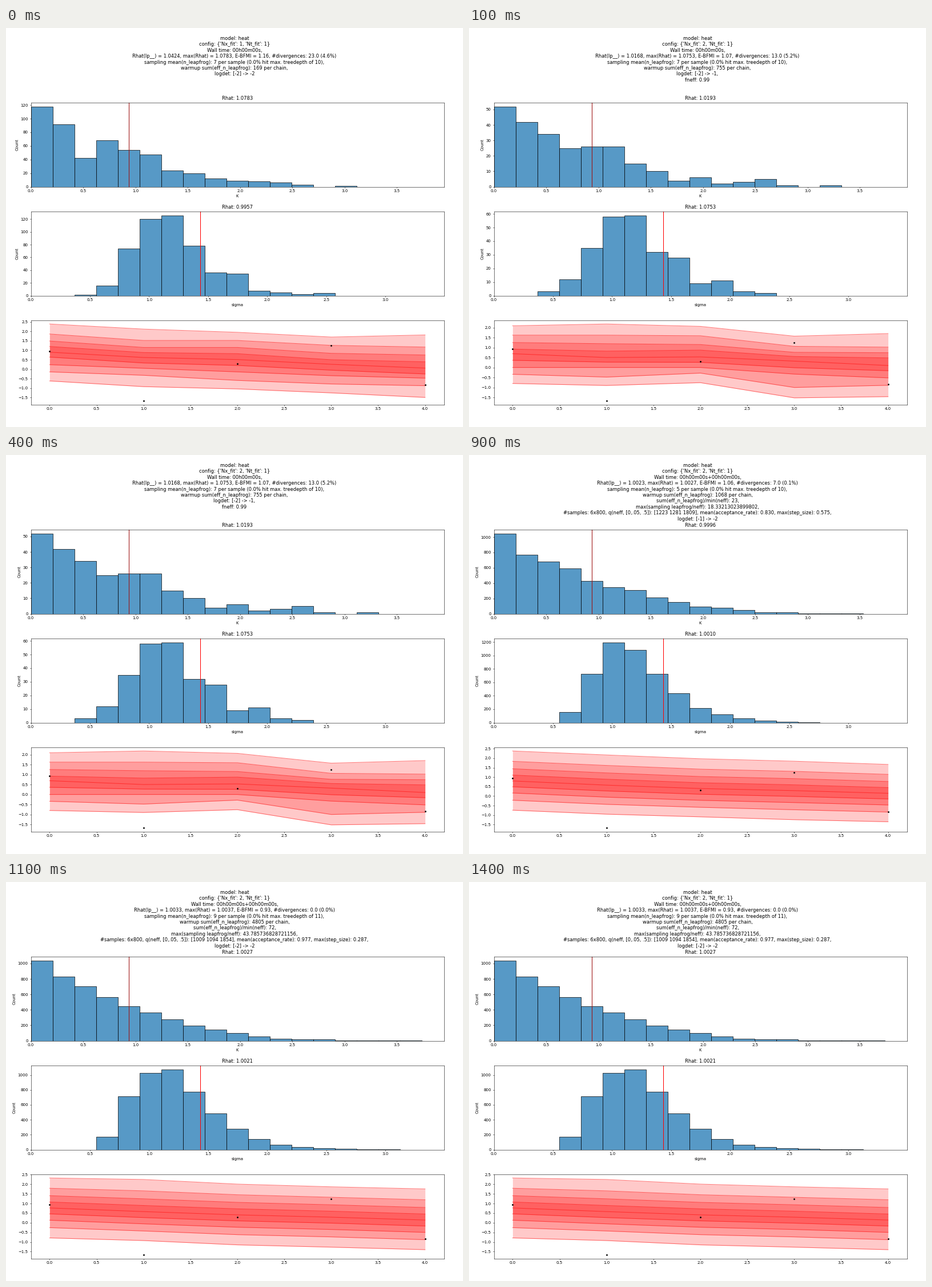
A matplotlib script for the animation above (1600 ms loop, 800 by 700 pixels).

```python
import matplotlib.pyplot as plt
import numpy as np
from matplotlib.animation import FuncAnimation

W, H, DPI = 800, 700, 50
STEP_MS, LOOP_MS = 100, 1600
STARTS = [0, 100, 600, 1100]
BINS = 19
LEFT, RIGHT = 43.5, 766.5
DAYS = np.arange(5)
OBSERVED = [0.94, -1.66, 0.30, 1.25, -0.83]
# normal deciles, 90 % down to 10 %
Z = np.array([1.2816, 0.8416, 0.5244, 0.2533, 0, -0.2533, -0.5244, -0.8416, -1.2816])

HEADERS = [
    """model: heat
config: {'Nx_fit': 1, 'Nt_fit': 1}
Wall time: 00h00m00s,
Rhat(lp__) = 1.0424, max(Rhat) = 1.0783, E-BFMI = 1.16, #divergences: 23.0 (4.6%)
sampling mean(n_leapfrog): 7 per sample (0.0% hit max. treedepth of 10),
warmup sum(eff_n_leapfrog): 169 per chain,
logdet: [-2] -> -2""",
    """model: heat
config: {'Nx_fit': 2, 'Nt_fit': 1}
Wall time: 00h00m00s,
Rhat(lp__) = 1.0168, max(Rhat) = 1.0753, E-BFMI = 1.07, #divergences: 13.0 (5.2%)
sampling mean(n_leapfrog): 7 per sample (0.0% hit max. treedepth of 10),
warmup sum(eff_n_leapfrog): 755 per chain,
logdet: [-2] -> -1,
fneff: 0.99""",
    """model: heat
config: {'Nx_fit': 2, 'Nt_fit': 1}
Wall time: 00h00m00s+00h00m00s,
Rhat(lp__) = 1.0023, max(Rhat) = 1.0027, E-BFMI = 1.06, #divergences: 7.0 (0.1%)
sampling mean(n_leapfrog): 5 per sample (0.0% hit max. treedepth of 10),
warmup sum(eff_n_leapfrog): 1068 per chain,
sum(eff_n_leapfrog)/min(neff): 23,
max(sampling leapfrog/neff): 18.33213023899802,
#samples: 6x800, q(neff, [0,.05, .5]): [1223 1281 1809], mean(acceptance_rate): 0.830, max(step_size): 0.575,
logdet: [-1] -> -2""",
    """model: heat
config: {'Nx_fit': 2, 'Nt_fit': 1}
Wall time: 00h00m00s+00h00m00s,
Rhat(lp__) = 1.0033, max(Rhat) = 1.0037, E-BFMI = 0.93, #divergences: 0.0 (0.0%)
sampling mean(n_leapfrog): 9 per sample (0.0% hit max. treedepth of 11),
warmup sum(eff_n_leapfrog): 4805 per chain,
sum(eff_n_leapfrog)/min(neff): 72,
max(sampling leapfrog/neff): 43.785736828721156,
#samples: 6x800, q(neff, [0,.05, .5]): [1009 1094 1854], mean(acceptance_rate): 0.977, max(step_size): 0.287,
logdet: [-2] -> -2""",
]

# (Rhat, first bin, counts)
K_HISTS = [
    ("1.0783", 0, [118, 92, 42, 68, 54, 47, 24, 20, 12, 9, 8, 6, 3, 0, 1]),
    ("1.0193", 0, [52, 42, 34, 25, 26, 26, 15, 10, 4, 6, 2, 3, 5, 1, 0, 1]),
    ("0.9996", 0, [1048, 766, 684, 590, 431, 343, 306, 209, 150, 95, 80, 46,
                   20, 17, 6, 3, 3]),
    ("1.0027", 0, [1040, 830, 701, 565, 450, 365, 280, 192, 144, 103, 55, 23,
                   16, 16, 4, 4, 3, 2]),
]
SIGMA_HISTS = [
    ("0.9957", 2, [1, 16, 74, 120, 126, 78, 36, 34, 8, 5, 2, 4]),
    ("1.0753", 2, [3, 12, 35, 58, 59, 32, 28, 9, 11, 3, 2]),
    ("1.0010", 3, [158, 730, 1199, 1084, 730, 438, 217, 123, 64, 34, 9, 5]),
    ("1.0021", 3, [168, 712, 1030, 1076, 778, 484, 275, 138, 65, 31, 16, 8, 7, 3]),
]


def deciles(mid, sd, skew):
    """Decile curves, one row per day, from median, spread and skew."""
    mid, sd, skew = (np.array(v)[:, None] for v in (mid, sd, skew))
    return mid + sd * Z + skew * Z**2


ROUGH_A = np.array([
    [2.39, 1.86, 1.49, 1.20, 0.90, 0.64, 0.24, -0.14, -0.62],
    [2.12, 1.52, 1.15, 0.88, 0.62, 0.33, 0.05, -0.32, -0.92],
    [1.95, 1.52, 1.15, 0.82, 0.51, 0.20, -0.14, -0.59, -1.04],
    [1.70, 1.26, 0.84, 0.50, 0.26, -0.05, -0.34, -0.78, -1.25],
    [1.81, 1.17, 0.75, 0.39, 0.06, -0.25, -0.47, -0.87, -1.49],
])
ROUGH_B = np.array([
    [2.09, 1.62, 1.25, 0.92, 0.69, 0.36, 0.00, -0.34, -0.80],
    [2.18, 1.62, 1.19, 0.82, 0.50, 0.27, 0.00, -0.48, -0.90],
    [2.06, 1.59, 1.15, 0.87, 0.53, 0.26, 0.00, -0.28, -0.76],
    [1.57, 1.06, 0.76, 0.55, 0.32, -0.01, -0.33, -1.00, -1.52],
    [1.70, 1.02, 0.74, 0.48, 0.10, -0.16, -0.52, -0.89, -1.46],
])
BANDS = [
    ROUGH_A,
    ROUGH_B,
    deciles([0.80, 0.58, 0.40, 0.29, 0.15],
            [1.217, 1.217, 1.194, 1.202, 1.178],
            [0.012, 0.018, 0.024, 0.006, 0.006]),
    deciles([0.77, 0.58, 0.41, 0.29, 0.14],
            [1.217, 1.240, 1.233, 1.225, 1.233],
            [0.000, 0.050, 0.012, 0.006, 0.024]),
]

fig = plt.figure(figsize=(W / DPI, H / DPI), dpi=DPI, facecolor="white")
plt.rcParams["font.family"] = "DejaVu Sans"


def panel(bottom):
    return fig.add_axes([LEFT / W, 1 - bottom / H, (RIGHT - LEFT) / W, 148 / H])


ax_k, ax_sigma, ax_fit = panel(278.5), panel(469.5), panel(660.5)
header = fig.suptitle("")


def draw_hist(ax, hist, name, top, truth, color):
    rhat, first, counts = hist
    width = top / BINS
    ax.clear()
    ax.bar(width * (first + np.arange(len(counts))), counts, width, align="edge",
           facecolor=(*np.array([31, 119, 180]) / 255, 0.75), edgecolor="black",
           linewidth=1)
    ax.axvline(truth, color=color, lw=1.5)
    ax.set(xlim=(0, top), ylim=(0, 1.05 * max(counts)), xlabel=name,
           ylabel="Count", title="Rhat: " + rhat)


def draw_fit(ax, bands):
    ax.clear()
    for i in range(4):
        ax.fill_between(DAYS, bands[:, i], bands[:, 8 - i], color="red",
                        alpha=0.21, lw=0)
    ax.plot(DAYS, bands, color="red", alpha=0.5, lw=1.5)
    ax.plot(DAYS, OBSERVED, "k.")
    low, high = min(OBSERVED), bands.max()
    pad = 0.05 * (high - low)
    ax.set(xlim=(-0.2, 4.2), ylim=(low - pad, high + pad))


def update(frame):
    run = np.searchsorted(STARTS, frame * STEP_MS, side="right") - 1
    header.set_text(HEADERS[run])
    draw_hist(ax_k, K_HISTS[run], "K", 3.948, 0.939, "#9c1010")
    draw_hist(ax_sigma, SIGMA_HISTS[run], "sigma", 3.493, 1.4348, "red")
    draw_fit(ax_fit, BANDS[run])
    return []


anim = FuncAnimation(fig, update, frames=LOOP_MS // STEP_MS, interval=STEP_MS,
                     init_func=lambda: update(0), repeat=True, repeat_delay=0,
                     blit=False)
plt.show()
```
